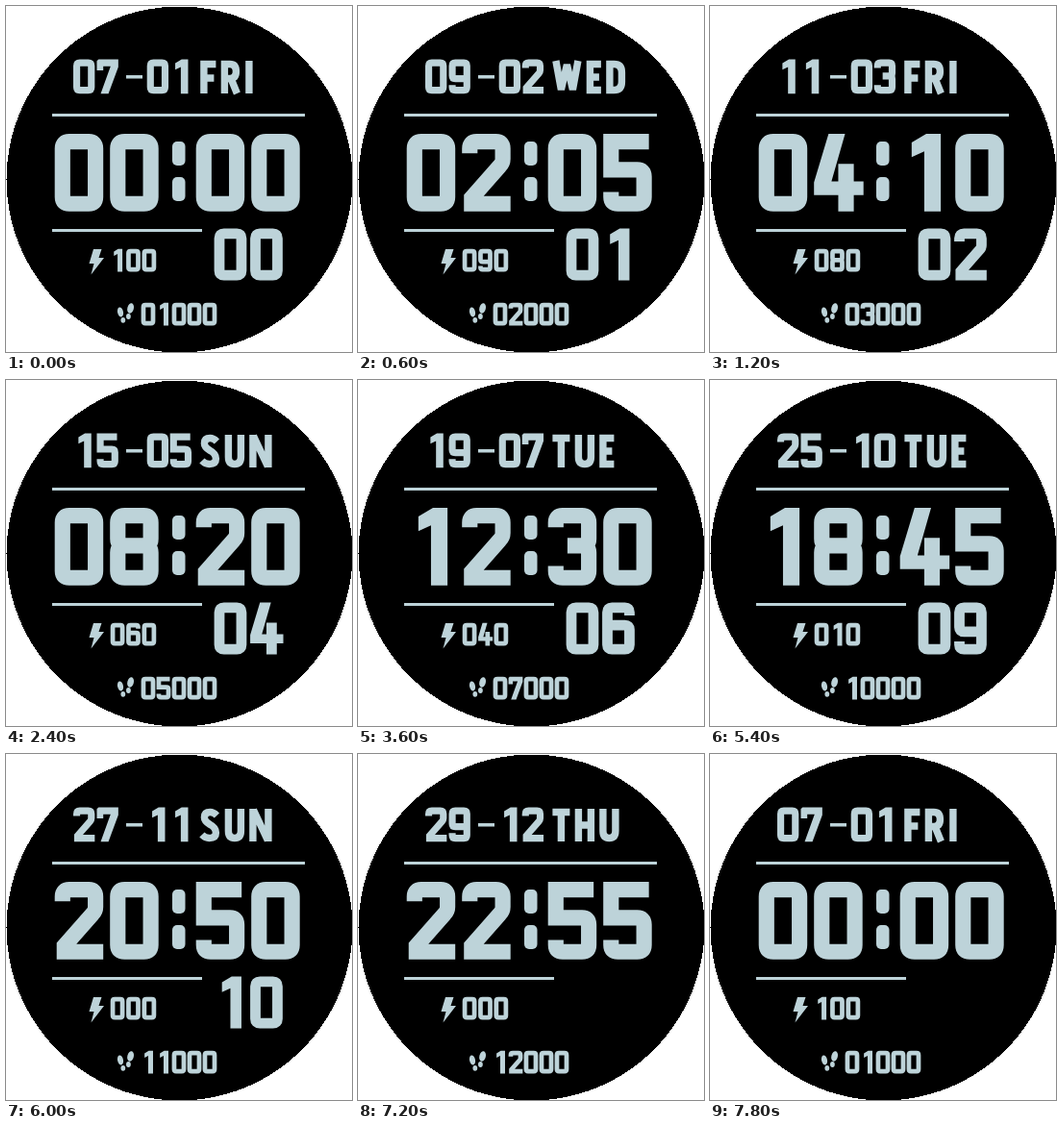
These frames come from a looping animation (360x360 px, 8.4 s). An HTML page:

```html
<!DOCTYPE html>
<html lang="en">
<head>
<meta charset="utf-8">
<title>Watch face</title>
<style>
  html, body { margin: 0; width: 100%; height: 100%; overflow: hidden; background: #fff; }
  svg { display: block; width: 100vw; height: 100vh; }
  .ink { fill: #bdd3d9; }
  .line { fill: none; stroke: #bdd3d9; }
</style>
</head>
<body>
<svg viewBox="0 0 360 360" role="img" aria-label="Digital watch face">
  <circle cx="180.5" cy="180.5" r="180" shape-rendering="crispEdges"/>
  <g class="ink">
    <path d="M48 112H311V115H48ZM48 232H204V235H48ZM125 72H142V75.5H125Z"/>
    <rect x="173" y="141" width="13.5" height="25" rx="5"/>
    <rect x="173" y="178" width="13.5" height="25" rx="5"/>
    <path d="M91 253H99.5L96.5 262H102L88.5 279.5L91.5 268H86.5Z"/>
    <ellipse cx="119" cy="318.5" rx="3" ry="5" transform="rotate(-12 119 318.5)"/>
    <ellipse cx="121.8" cy="326.8" rx="2.4" ry="2.9"/>
    <ellipse cx="129.6" cy="314.5" rx="3.3" ry="5.3" transform="rotate(14 129.6 314.5)"/>
    <ellipse cx="127.4" cy="323" rx="2.4" ry="2.9"/>
  </g>
  <g id="face"></g>
</svg>
<script>
  const STEP = 600, STEPS = 14, LAST = 11;
  const face = document.getElementById('face');

  // Digits live in a 50 x 80 box; 1, 4 and 7 are filled, the rest are stroked.
  const solid = {
    1: 'M27 0H42V80H25V18L12 24V9Z',
    4: 'M15 0H32L18 49H25V31H41V49H51V63H41V80H25V63H0V50Z',
    7: 'M4 0H50V18L27 80H9L32 16H15V26H0V4Z'
  };
  const stroked = {
    0: 'M15 8H35q7 0 7 7V65q0 7-7 7H15q-7 0-7-7V15q0-7 7-7Z',
    2: 'M8 20V15q0-7 7-7H35q7 0 7 7V26q0 4-3 7L10 66V72H50',
    3: 'M8 20V15q0-7 7-7H35q7 0 7 7V32q0 7-7 7q7 0 7 7V65q0 7-7 7H15q-7 0-7-7V60M20 39H35',
    5: 'M47 8H8V37H35q7 0 7 7V65q0 7-7 7H15q-7 0-7-7V60',
    6: 'M42 20V15q0-7-7-7H15q-7 0-7 7V65q0 7 7 7H35q7 0 7-7V42q0-7-7-7H8',
    8: 'M15 8H35q7 0 7 7V32q0 7-7 7H15q-7 0-7-7V15q0-7 7-7ZM15 39H35q7 0 7 7V65q0 7-7 7H15q-7 0-7-7V46q0-7 7-7Z',
    9: 'M8 60V65q0 7 7 7H35q7 0 7-7V15q0-7-7-7H15q-7 0-7 7V38q0 7 7 7H42'
  };

  // Letters: width, then a stroked path 34 high.
  const letters = {
    D: [20, 'M3.5 3.5H8Q16 3.5 16 12V22Q16 30.5 8 30.5H3.5Z'],
    E: [15, 'M15 3.5H3.5V30.5H15M3.5 17H13'],
    F: [16, 'M3.5 34V3.5H16M3.5 18H14'],
    H: [20, 'M3.5 0V34M16.5 0V34M3.5 17H16.5'],
    I: [7, 'M3.5 0V34'],
    N: [23, 'M3.5 34V0M19.5 34V0M4 1L19 33'],
    R: [20, 'M3.5 34V3.5H9Q15.5 3.5 15.5 11T9 18.5H4M10 18L16.5 34'],
    S: [20, 'M17 7Q13.5 3.5 10 3.5Q4 3.5 4 9Q4 13 10 16.5Q16 19.5 16 25Q16 30.5 9 30.5Q5 30.5 1.5 27'],
    T: [18, 'M0 3.5H18M9 0V34'],
    U: [20, 'M3.5 0V23Q3.5 30.5 10 30.5T16.5 23V0'],
    W: [30, 'M3.5 0L9 30L15 4L21 30L26.5 0']
  };
  const days = ['SUN', 'MON', 'TUE', 'WED', 'THU', 'FRI', 'SAT'];

  const glyph = (path, cls, width, x, y, scale) =>
    `<path class="${cls}" d="${path}" stroke-width="${width}" transform="translate(${x} ${y}) scale(${scale})"/>`;

  function number(value, size, x, y, scale, pitch) {
    return [...String(value).padStart(size, '0')].map((c, i) => solid[c]
      ? glyph(solid[c], 'ink', 0, x + i * pitch, y, scale)
      : glyph(stroked[c], 'line', 16, x + i * pitch, y, scale)).join('');
  }

  function word(text, x, y) {
    return [...text].map(c => {
      const [width, path] = letters[c];
      const out = glyph(path, 'line', 7.4, x, y, 1);
      x += width + 5.5;
      return out;
    }).join('');
  }

  function render(step) {
    const n = step > LAST + 1 ? 0 : Math.min(step, LAST);
    const day = 7 + 2 * n;
    const weekday = days[new Date(Date.UTC(2022, n, day)).getUTCDay()];
    face.innerHTML =
      number(day, 2, 70, 55.5, 0.447, 24.5) +
      number(n + 1, 2, 146.7, 55.5, 0.447, 24) +
      word(weekday, 202.4, 57) +
      number(2 * n, 2, 50.7, 133, 1.01, 57.5) +
      number(5 * n, 2, 197.7, 133, 1.01, 57.5) +
      (step <= LAST ? number(n, 2, 216.6, 231.5, 0.675, 37.5) : '') +
      number(Math.max(0, 100 - 10 * n), 3, 108.7, 252.8, 0.295, 16.4) +
      number(1000 * (n + 1), 5, 140.6, 308.8, 0.295, 16);
  }

  let shown = -1;
  function tick() {
    const step = Math.floor(performance.now() / STEP) % STEPS;
    if (step !== shown) render(shown = step);
    requestAnimationFrame(tick);
  }
  tick();
</script>
</body>
</html>
```
